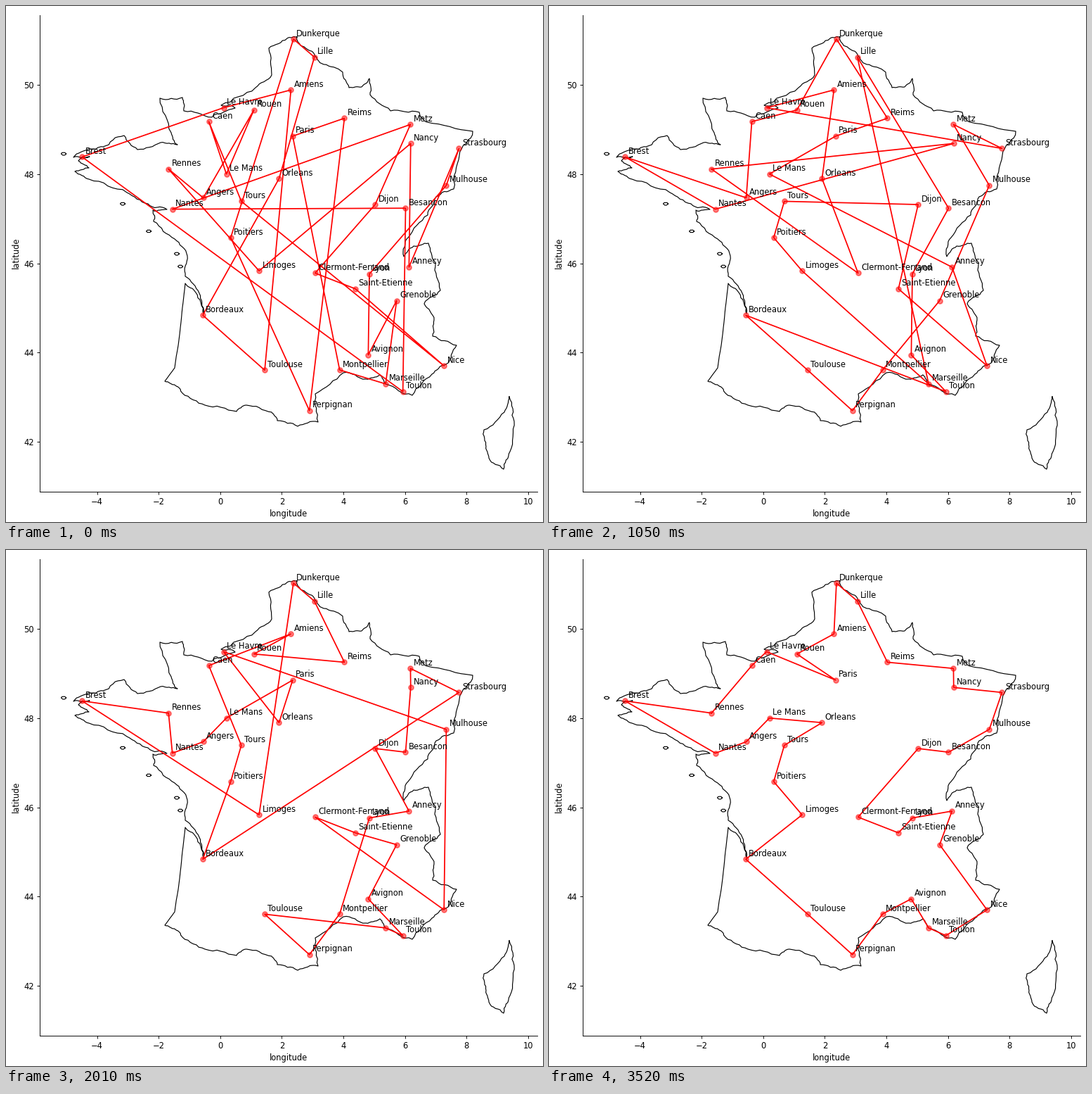
Animation, 764 px wide and 733 px high, one loop 5.02 s. Source, as a matplotlib script:

```python
import numpy as np
import matplotlib.pyplot as plt
from matplotlib.animation import FuncAnimation

W, H, DPI = 764, 733, 64
TICK_MS, LOOP_MS = 20, 5020
FIRST_MS, LAST_MS = 500, 3520

plt.rcParams.update({
    "font.family": "DejaVu Sans", "font.size": 13,
    "axes.linewidth": 1.04, "axes.labelpad": 5.2,
})

CITIES = {
    "dk": ("Dunkerque", 2.377, 51.035), "li": ("Lille", 3.057, 50.629),
    "am": ("Amiens", 2.296, 49.894), "lh": ("Le Havre", 0.108, 49.494),
    "ro": ("Rouen", 1.093, 49.443), "ca": ("Caen", -0.371, 49.183),
    "re": ("Reims", 4.032, 49.258), "me": ("Metz", 6.176, 49.119),
    "ny": ("Nancy", 6.184, 48.692), "st": ("Strasbourg", 7.752, 48.580),
    "pa": ("Paris", 2.352, 48.857), "br": ("Brest", -4.486, 48.390),
    "rn": ("Rennes", -1.678, 48.117), "lm": ("Le Mans", 0.200, 48.006),
    "or": ("Orleans", 1.909, 47.903), "an": ("Angers", -0.552, 47.473),
    "na": ("Nantes", -1.554, 47.218), "to": ("Tours", 0.685, 47.394),
    "mu": ("Mulhouse", 7.339, 47.751), "di": ("Dijon", 5.030, 47.322),
    "be": ("Besancon", 6.018, 47.240), "po": ("Poitiers", 0.340, 46.580),
    "lg": ("Limoges", 1.261, 45.834), "cf": ("Clermont-Ferrand", 3.080, 45.783),
    "ly": ("Lyon", 4.842, 45.764), "ay": ("Annecy", 6.129, 45.918),
    "se": ("Saint-Etienne", 4.390, 45.430), "gr": ("Grenoble", 5.727, 45.165),
    "bx": ("Bordeaux", -0.566, 44.838), "tl": ("Toulouse", 1.444, 43.605),
    "av": ("Avignon", 4.806, 43.949), "mo": ("Montpellier", 3.877, 43.611),
    "ma": ("Marseille", 5.370, 43.297), "tn": ("Toulon", 5.930, 43.125),
    "ni": ("Nice", 7.266, 43.702), "pe": ("Perpignan", 2.896, 42.697),
}

# Step of the search -> tour reached at that step.
ROUTES = {
    0: "bx tl am lh br tn be na me di cf se ni to ca lm ro an "
       "rn lg ny ay st mu ly av gr ma mo pa re pe po dk li or",
    6: "bx ca ro dk re am rn ny mo lg po to di se pe ma gr tn "
       "ni mu cf ly be li or pa lh st me ay lm av tl an br na",
    13: "bx tl pe mo gr mu me st lh am or cf rn li dk ca na lm "
        "to se po lg be ny re pa an br ro ay di ma ni ly av tn",
    23: "bx st me ny be di ay ly mo pe tl ma tn av gr se cf ni "
        "mu lh or pa lm an na rn br lg dk li re ro am ca to po",
    30: "bx cf or di ly ay mu av pe mo tl ma tn ni gr se be st "
        "ny re me li dk ca lh ro am pa lm rn br na an to po lg",
    36: "bx tl pe mo av ma tn ni ay se gr ly cf or be di mu st "
        "ny me re am li dk ro pa lh ca an lm br rn na to po lg",
    45: "bx tl pe mo av ma tn ni gr ay ly se cf di be mu st ny "
        "me re li dk am ro pa lh ca rn br na an lm or to po lg",
}

# Key points of the outline in stage pixels, clockwise from the northern tip.
EAST = [
    (414, 44), (419, 56), (437, 66), (452, 83), (479, 94), (488, 116),
    (506, 115), (517, 103), (518, 126), (547, 149), (588, 151), (599, 165),
    (664, 178), (645, 212), (637, 260), (612, 271), (600, 297), (572, 329),
    (566, 356), (580, 341), (601, 337), (611, 365), (618, 404), (595, 423),
    (609, 446), (607, 469), (641, 482), (626, 509)]
SOUTH = [
    (626, 509), (606, 523), (578, 553), (540, 537), (532, 524), (512, 530),
    (480, 521), (440, 551), (444, 591), (415, 597), (386, 589), (378, 577),
    (342, 567), (328, 576), (283, 567), (251, 550), (241, 539), (226, 533)]
LANDES = [(226, 533), (240, 514), (249, 449), (255, 394)]
WEST = [
    (255, 394), (270, 407), (281, 437), (275, 408), (255, 384), (258, 355),
    (240, 331), (210, 306), (209, 290), (229, 289), (202, 281), (172, 265),
    (118, 246), (98, 235), (118, 230), (103, 220), (119, 214), (96, 215),
    (118, 203)]
NORTH = [
    (118, 203), (138, 200), (168, 184), (187, 204), (220, 194), (244, 197),
    (235, 180), (219, 131), (251, 130), (253, 149), (293, 158), (326, 145),
    (306, 141), (355, 116), (378, 98), (374, 60), (400, 46), (414, 44)]
CORSICA = [
    (716, 555), (723, 590), (717, 633), (708, 658), (687, 642), (683, 626),
    (680, 602), (709, 577), (716, 555)]
ISLETS = [(82, 210), (166, 281), (203, 320), (243, 352), (248, 370)]

rng = np.random.default_rng(4)


def jag(points, rough=0.14, cap=2.2, rounds=3):
    """Roughen a polyline: halve its segments and push the midpoints aside."""
    p = np.array(points, float)
    for _ in range(rounds):
        seg = np.diff(p, axis=0)
        length = np.hypot(seg[:, 0], seg[:, 1])[:, None]
        normal = np.column_stack([-seg[:, 1], seg[:, 0]]) / length
        push = rng.uniform(-1, 1, length.shape) * np.minimum(rough * length, cap)
        out = np.empty((2 * len(p) - 1, 2))
        out[::2] = p
        out[1::2] = (p[:-1] + p[1:]) / 2 + normal * push
        p = out
    return p


def islet(x, y):
    a = np.linspace(0, 2 * np.pi, 7)
    return jag(np.column_stack([x + 3.5 * np.cos(a), y + 2 * np.sin(a)]), rounds=1)


def to_degrees(p):
    return (p[:, 0] - 304.8) / 43.82, 50 - (p[:, 1] - 112.5) / 63.31


def from_rennes(route):
    stops = route.split()
    i = stops.index("rn")
    return stops[i:] + stops[:i]


def reversals(start, goal):
    """Tours met while turning start into goal by reversing stretches."""
    tour, met = list(start), [list(start)]
    for i, city in enumerate(goal):
        j = tour.index(city)
        if j != i:
            tour[i:j + 1] = tour[i:j + 1][::-1]
            met.append(list(tour))
    return met


def build_tours():
    keys = list(ROUTES)
    tours = [from_rennes(ROUTES[0])]
    for a, b in zip(keys, keys[1:]):
        goal = from_rennes(ROUTES[b])
        ways = [reversals(tours[-1], g) for g in (goal, goal[:1] + goal[:0:-1])]
        met = min(ways, key=len)
        last = len(met) - 1
        tours += [met[round(last * k / (b - a))] for k in range(1, b - a + 1)]
    return tours


def tour_line(tour):
    return np.array([CITIES[c][1:] for c in tour + tour[:1]]).T


LINES = [tour_line(t) for t in build_tours()]

fig = plt.figure(figsize=(W / DPI, H / DPI), dpi=DPI, facecolor="white")
ax = fig.add_axes([48 / W, 1 - 689.5 / H, 708 / W, 677 / H])

mainland = np.vstack([jag(EAST), jag(SOUTH), jag(LANDES, 0.01),
                      jag(WEST), jag(NORTH)])
for shape in [mainland, jag(CORSICA)] + [islet(*c) for c in ISLETS]:
    ax.plot(*to_degrees(shape), color="black", lw=1.3, zorder=0.9)

lons, lats = zip(*(c[1:] for c in CITIES.values()))
ax.scatter(lons, lats, s=61, color="red", alpha=0.5, linewidths=1.95)
for name, lon, lat in CITIES.values():
    ax.text(lon + 0.1, lat + 0.07, name)
path, = ax.plot(*LINES[0], color="red", lw=1.95)

ax.spines[["top", "right"]].set_visible(False)
ax.tick_params(length=4.55, width=1.04, pad=4.55)
ax.set_xlim(-5.86, 10.297)
ax.set_ylim(40.886, 51.579)
ax.set_xticks(range(-4, 11, 2))
ax.set_yticks(range(42, 51, 2))
ax.set_xlabel("longitude")
ax.set_ylabel("latitude")


def draw(n):
    last = len(LINES) - 1
    since = n * TICK_MS + TICK_MS // 2 - FIRST_MS
    step = since * (last - 1) // (LAST_MS - FIRST_MS) + 1
    path.set_data(*LINES[min(max(step, 0), last)])
    return path,


anim = FuncAnimation(fig, draw, frames=LOOP_MS // TICK_MS, interval=TICK_MS,
                     repeat=True, repeat_delay=0)
plt.show()
```
